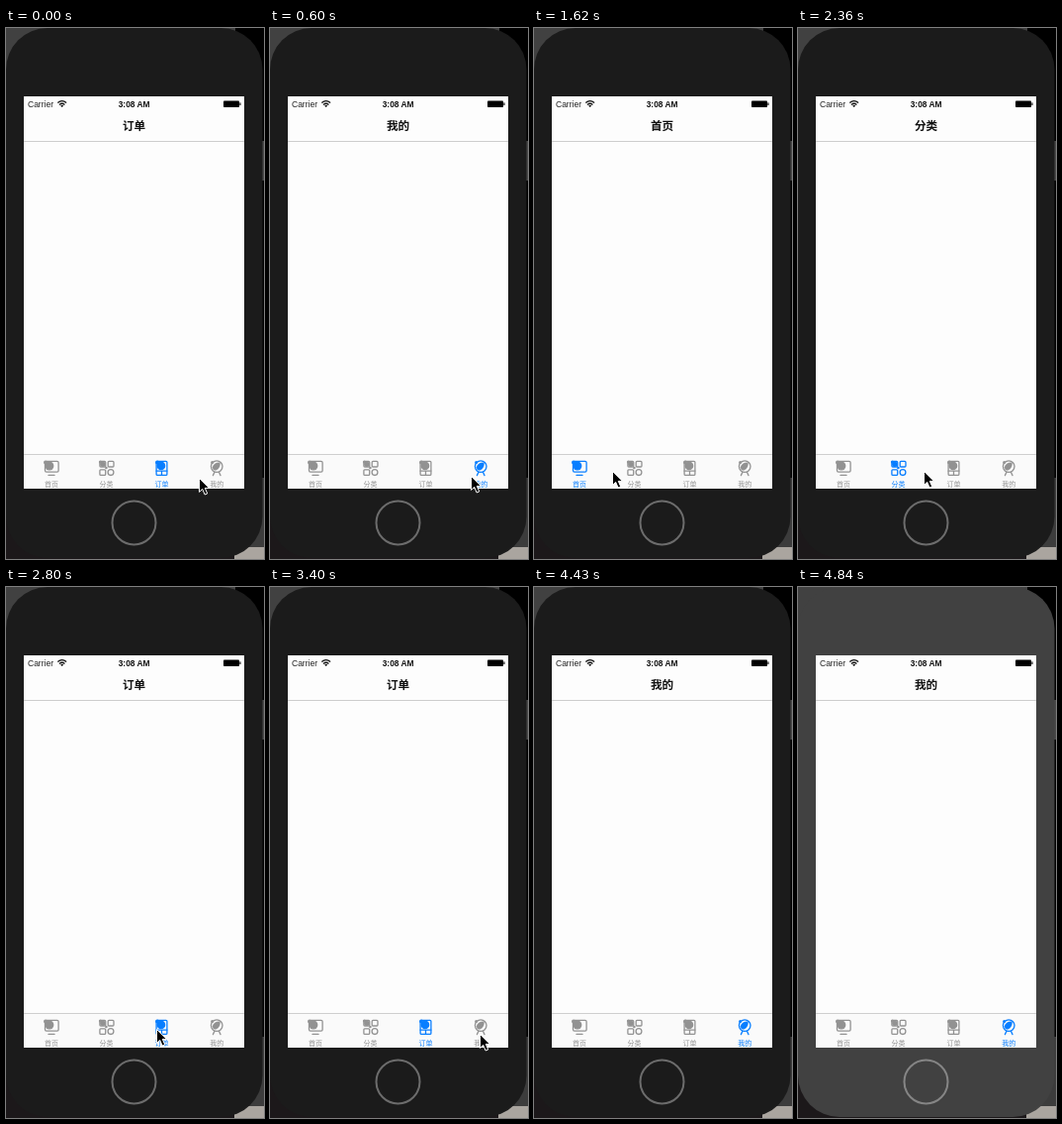
These frames come from a looping animation (261x536 px, 4940 ms). An HTML page:

```html
<!DOCTYPE html>
<html lang="zh-CN">
<head>
<meta charset="utf-8">
<title>Tab bar</title>
<style>
html, body { margin: 0; width: 100%; height: 100%; overflow: hidden; background: #000; }
svg { display: block; width: 261px; height: 536px; }
text { font-family: "Liberation Sans", "Noto Sans CJK SC", "Noto Sans CJK", sans-serif; text-anchor: middle; }
.body { fill: #1b1b1b; }
.ring { fill: none; stroke: #6c6c6c; stroke-width: 2; }
.flash .body { fill: #414141; }
.flash .ring { stroke: #858585; }
.tab { color: #929292; }
.tab.on { color: #087eff; }
.tab text { font-size: 7px; fill: currentColor; }
.line { fill: none; stroke: currentColor; stroke-width: 1.3; stroke-linecap: round; stroke-linejoin: round; }
.fill { fill: currentColor; }
</style>
</head>
<body>
<svg id="stage" viewBox="0 0 261 536">
  <rect width="261" height="536" fill="#000"/>
  <rect width="232" height="60" fill="#414141"/>
  <rect y="60" width="2" height="420" fill="#1d2424"/>
  <rect y="480" width="231" height="56" fill="#1c181a"/>
  <rect x="258" y="114" width="3" height="40" fill="#484848"/>
  <rect x="246" y="454" width="15" height="70" fill="#3c3c3c"/>
  <rect x="231" y="524" width="30" height="12" fill="#aaa59f"/>
  <rect class="body" width="259.5" height="535" rx="42"/>
  <circle class="ring" cx="129.5" cy="499.5" r="22"/>

  <rect x="18" y="69" width="223" height="396" fill="#fdfdfd"/>
  <rect x="18" y="114" width="223" height="1" fill="#cdcdcd"/>
  <rect x="18" y="430" width="223" height="35" fill="#fafafa"/>
  <rect x="18" y="430" width="223" height="1" fill="#cfcfcf"/>

  <text x="35" y="79.7" font-size="8.5" fill="#222">Carrier</text>
  <g fill="none" stroke="#111" stroke-width="1.3">
    <path d="M52.3 75.6Q56.7 71.6 61.1 75.6"/>
    <path d="M54 77.4Q56.7 75 59.4 77.4"/>
  </g>
  <path d="M55.2 78.4Q56.7 77.2 58.2 78.4L56.7 80Z" fill="#111"/>
  <text x="129.6" y="79.7" font-size="8.4" font-weight="bold" fill="#111">3:08 AM</text>
  <rect x="220" y="73.5" width="16" height="6.5" rx=".8" fill="#000"/>
  <rect x="236.4" y="75.4" width="1.1" height="2.7" fill="#000"/>
  <text id="title" x="129.5" y="103.2" font-size="11.6" font-weight="bold" fill="#111"></text>

  <g id="tabs">
    <g class="tab">
      <rect class="line" x="39.5" y="437.3" width="13.6" height="10.8" rx="1.4"/>
      <path class="line" d="M43 451.4H49"/>
      <circle class="fill" cx="43.9" cy="442" r="4.5"/>
      <circle class="fill" cx="40" cy="438.6" r="2"/>
      <text x="46" y="462.6">首页</text>
    </g>
    <g class="tab">
      <rect class="line" x="94.9" y="437.4" width="5.8" height="5.6" rx="1"/>
      <rect class="line" x="103.2" y="437.4" width="5.8" height="5.6" rx="1"/>
      <rect class="line" x="94.9" y="445.8" width="5.8" height="5.6" rx="1"/>
      <circle class="line" cx="106" cy="448.6" r="2.9"/>
      <circle class="fill" cx="97.8" cy="440.2" r="2.7"/>
      <circle class="fill" cx="95.4" cy="438" r="1.5"/>
      <circle class="fill" cx="101.4" cy="444" r="1.3"/>
      <text x="101.6" y="462.6">分类</text>
    </g>
    <g class="tab">
      <rect class="line" x="152.1" y="437.3" width="10.8" height="14.1" rx="1"/>
      <path class="line" d="M152.1 447.1H162.9M157.5 447.1V451.4"/>
      <circle class="fill" cx="156.9" cy="441.9" r="4.4"/>
      <circle class="fill" cx="153" cy="438.4" r="1.9"/>
      <text x="157.4" y="462.6">订单</text>
    </g>
    <g class="tab">
      <circle class="line" cx="213.2" cy="442.6" r="5.8"/>
      <path class="line" d="M211 448.3L209.4 451.6M215.4 448.3L217 451.6"/>
      <path class="fill" d="M208.7 443.6Q210 438.2 216.6 438.4Q217.4 444.2 212.4 446.4Q209.4 447.4 208.7 443.6Z"/>
      <circle class="fill" cx="208.6" cy="438.6" r="1.5"/>
      <text x="213.2" y="462.6">我的</text>
    </g>
  </g>

  <path id="cursor" d="M.5 .5V14.4L3.7 11.4L6.1 17L8.7 15.9L6.3 10.4H10.6Z"
    fill="#000" stroke="#fff" stroke-width="1" stroke-linejoin="round"/>
</svg>
<script>
const LOOP = 4940, FLASH = 4840;
const [HOME, SORT, ORDER, MINE] = [0, 1, 2, 3];

// time, selected tab, pointer x, y (no pointer when left out)
const steps = [
  [0, ORDER, 195, 454],
  [150, ORDER, 210, 454],
  [450, MINE, 210, 453],
  [600, MINE, 203, 452],
  [740, MINE, 163, 446],
  [890, MINE, 108, 440],
  [1040, MINE, 62, 436],
  [1190, MINE, 41, 435],
  [1330, MINE, 40, 437],
  [1480, HOME, 43, 440],
  [1620, HOME, 79, 447],
  [1770, HOME, 96, 447],
  [1920, HOME, 99, 446],
  [2070, SORT, 100, 446],
  [2210, SORT, 108, 447],
  [2360, SORT, 127, 447],
  [2510, SORT, 146, 446],
  [2650, SORT, 151, 446],
  [2800, ORDER, 152, 446],
  [2950, ORDER, 161, 447],
  [3100, ORDER, 184, 449],
  [3250, ORDER, 206, 451],
  [3400, ORDER, 212, 451],
  [3700, MINE, 212, 452],
  [3850, MINE, 212, 455],
  [4000, MINE, 208, 470],
  [4140, MINE, 201, 496],
  [4290, MINE, 194, 522],
  [4430, MINE]
];

const stage = document.getElementById("stage");
const title = document.getElementById("title");
const cursor = document.getElementById("cursor");
const tabs = [...document.querySelectorAll(".tab")];
const names = tabs.map(tab => tab.querySelector("text").textContent);
const start = performance.now();

function draw(now) {
  const t = Math.max(0, now - start) % LOOP;
  const [, tab, x, y] = steps.findLast(step => step[0] <= t);
  title.textContent = names[tab];
  tabs.forEach((el, i) => el.classList.toggle("on", i === tab));
  cursor.style.display = x === undefined ? "none" : "";
  if (x !== undefined) cursor.setAttribute("transform", `translate(${x} ${y})`);
  stage.classList.toggle("flash", t >= FLASH);
  requestAnimationFrame(draw);
}
draw(start);
</script>
</body>
</html>
```
